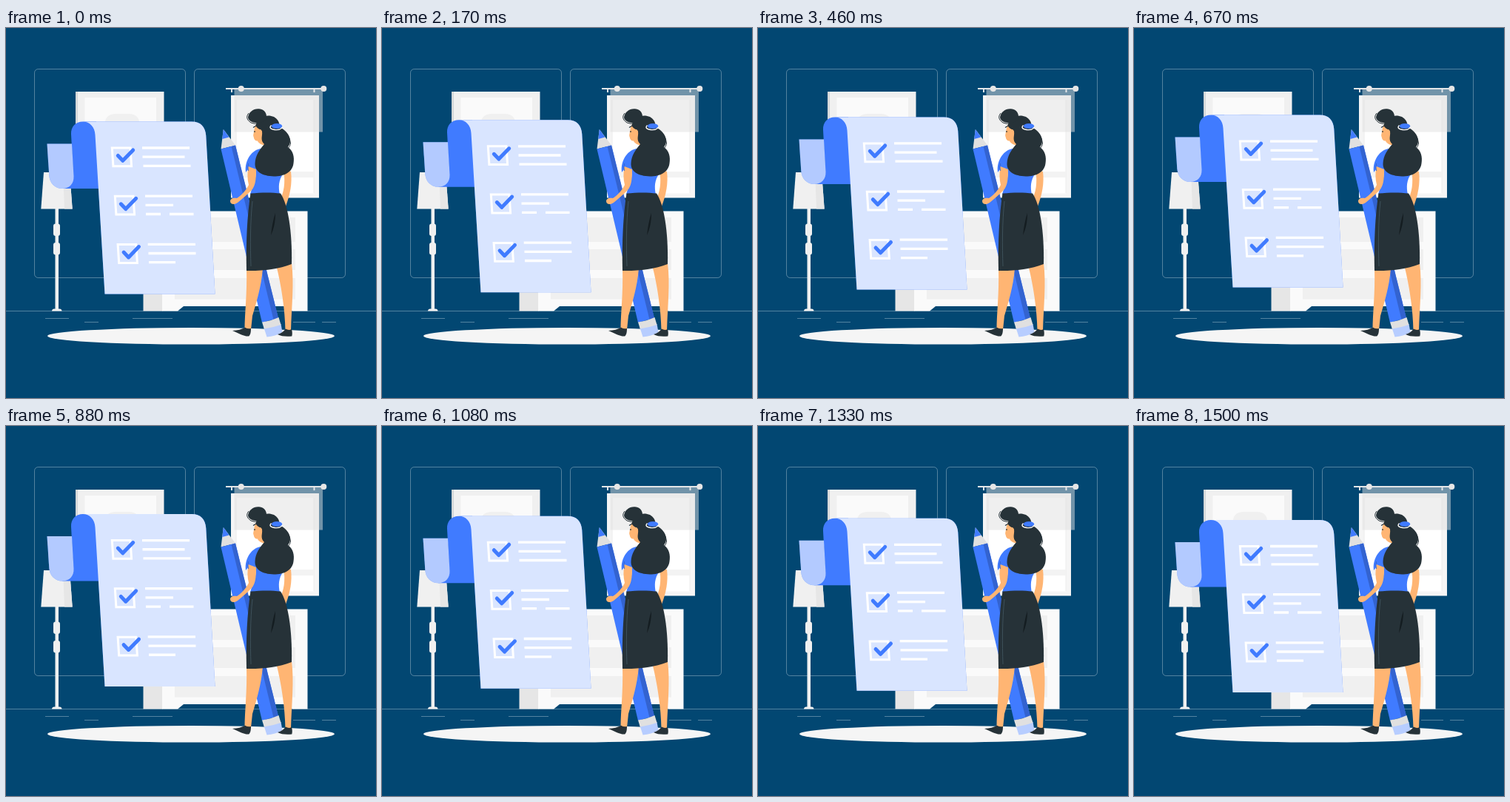
Write an HTML page that moves like this. It is 500 by 500 pixels and loops after 1540 ms.

```html
<!DOCTYPE html>
<html lang="en">
<head>
<meta charset="utf-8">
<title>Checklist</title>
<style>
  html, body { margin: 0; width: 100%; height: 100%; overflow: hidden; background: #024772; }
  svg { display: block; width: 100vw; height: 100vh; }
  .blue { fill: #407bff; }
  .skin { fill: #ffb573; }
  .dark { fill: #263238; }
  .thin { fill: none; stroke: #d8e3ea; stroke-opacity: .38; stroke-width: 1; }
</style>
</head>
<body>
<svg viewBox="0 0 500 500">
  <defs>
    <path id="sheet" d="M104 127H251C263 127 269.500 134 270.300 146L282.500 360H133.500L120.500 145C120 134 113 127 104 127Z"/>
    <path id="flap" d="M55.500 157H89L91.500 201C92 211 85.500 217.500 76 217.500C66 217.500 59 210 58.300 200Z"/>
    <g id="tick">
      <path d="M143.300 162.500H168L169.600 187.300H144.900Z" fill="none" stroke="#fff" stroke-width="3"/>
      <path d="M151.300 173L157.800 179.800L171.700 165.500" fill="none" stroke="#407bff" stroke-width="5" stroke-linecap="round" stroke-linejoin="round"/>
    </g>
  </defs>

  <!-- wall and floor -->
  <g class="thin">
    <rect x="38.500" y="55.500" width="204" height="282" rx="5"/>
    <rect x="254.500" y="55.500" width="204" height="282" rx="5"/>
    <path d="M0 382.500H500M53 392.500H85M106 397.500H125M171 392.500H225M388 397.500H418M427 397.500H446"/>
  </g>
  <ellipse cx="250" cy="416.300" rx="194" ry="11.300" fill="#f5f5f5"/>

  <!-- picture -->
  <rect x="94" y="86" width="4" height="114" fill="#d5d8da"/>
  <rect x="97" y="86" width="116.500" height="114" fill="#f0f0f0"/>
  <rect x="106.500" y="94" width="96.500" height="98" fill="#fafafa"/>
  <path d="M134 128C134 120 140 116 148 116H166C174 116 180 120 180 128Z" fill="#f0f0f0"/>

  <!-- window -->
  <rect x="304" y="91" width="119" height="138.500" fill="#f5f5f5"/>
  <rect x="311" y="97" width="105" height="126.500" fill="#fff"/>
  <path d="M311 97V223M416 97V223" stroke="#ececec"/>
  <rect x="311" y="194" width="105" height="8" fill="#f3f3f3"/>
  <rect x="308.500" y="83" width="119.500" height="57.500" fill="#e0e0e0" opacity=".5"/>
  <path d="M297 82H429M305 82V87M416.500 82V87" fill="none" stroke="#e4e6e8" stroke-width="2"/>
  <circle cx="317.800" cy="82" r="4" fill="#e6e6e6"/>
  <circle cx="429.300" cy="82" r="4" fill="#e6e6e6"/>

  <!-- drawers -->
  <rect x="185.500" y="247.500" width="26" height="135" fill="#e6e6e6"/>
  <path d="M211 247.500H407.500V382.500H387L379 376H240L232 382.500H211Z" fill="#fafafa"/>
  <path d="M228 256H391V289H228ZM228 299H391V327H228ZM228 338H391V366.500H228Z" fill="#f0f0f0"/>

  <!-- lamp -->
  <path d="M66.500 244H71V381H66.500Z" fill="#f0f0f0"/>
  <rect x="64" y="264.500" width="9" height="16.500" rx="3" fill="#f0f0f0"/>
  <rect x="64" y="290" width="9" height="16.500" rx="3" fill="#f0f0f0"/>
  <path d="M62 382.500C62 380.500 63.500 379.500 65 379.500H72.500C74 379.500 75.500 380.500 75.500 382.500Z" fill="#f0f0f0"/>
  <path d="M51 195H86L89.700 244.500H47.300Z" fill="#f0f0f0"/>
  <path d="M77 195H86L89.700 244.500H79Z" fill="#e6e6e6"/>

  <!-- paper -->
  <g id="paper">
    <path class="blue" d="M104 127C94 127 87.500 134 88 144L91 200L76 217.500H126.500L122 127Z"/>
    <use href="#flap" class="blue"/>
    <use href="#flap" fill="#fff" opacity=".6"/>
    <use href="#sheet" class="blue"/>
    <use href="#sheet" fill="#fff" opacity=".8"/>
    <use href="#tick"/>
    <use href="#tick" x="4" y="65.300"/>
    <use href="#tick" x="7.800" y="130.600"/>
    <path d="M184 162.500H248M184.500 174.700H241.500M185.500 186.800H249.500
      M188 227.600H252M188.500 239.800H226M189 252H209M221 252H253.500
      M191.700 292.800H256M192.500 305H256.500M193 317.200H229" fill="none" stroke="#fff" stroke-width="3.300"/>
  </g>

  <!-- pencil -->
  <path d="M293.800 137L310 158.500L290.500 163.500Z" fill="#e0e0e0"/>
  <path class="blue" d="M293.800 137L301.500 147.500L292.300 150Z"/>
  <path class="blue" d="M290.500 163.500L310 158.500L368 392L346 398Z"/>
  <path d="M304.500 160L310 158.500L368 392L361.500 394Z" fill="#3363d0"/>
  <path d="M348.500 405L371.500 400L373.500 411C367 415 360 417 352.500 417.500Z" fill="#b7cdff"/>
  <path d="M346 397.500Q357 396 368.500 391L371.500 401Q360 405 348.800 406.500Z" fill="#e0e0e0"/>

  <!-- legs and shoes -->
  <path class="skin" d="M325 325H347C345 350 338 372 333 389L331 408H322.500C322.500 385 326 360 325 325Z"/>
  <path class="skin" d="M365.500 322L386 318C389.500 345 386 375 385 409H377.500C377 380 372 348 365.500 322Z"/>
  <path class="dark" d="M306 409C313 409 319 407 323 404.800Q327 407 331 406C331 412 330 415 328 416.600C321 417 314 412 306 409Z"/>
  <path class="dark" d="M377.800 406.500Q382 409 386 407C387 411 387 414 386.300 416.500C380 417 372 417 367 414C372 412.500 375.500 410 377.800 406.500Z"/>

  <!-- body -->
  <path class="skin" d="M375 190L385 194C387 210 384 225 378 241L372 229C377 216 377 205 375 190Z"/>
  <path class="blue" d="M345 163C333 164 322 178 324 195L328 190L338 193C338 205 333 213 330 225H370C368 215 368 206 375 196L373 166Z"/>
  <path class="skin" d="M327.500 187L338 191C338 205 337 213 332 219C325 226 319 231 313 236C309 239 303 239 303 234C303 230 308 229 312 230C318 226 324 220 328 212C326 204 326 196 327.500 187Z"/>
  <path d="M327.500 183Q326 188 327.500 193" fill="none" stroke="#3363d0"/>
  <path class="dark" d="M330.500 223.500C345 222 360 222 371 223.500C381 238 387 275 386 319C368 326 345 328.500 325 328C324 290 326 252 330.500 223.500Z"/>
  <path d="M333 234C330 262 330 294 331 322" fill="none" stroke="#455a64" stroke-width=".8"/>
  <path d="M364 250C364 262 362 271 358 280C359 270 361 259 364 250Z" fill="#141d21"/>

  <!-- head -->
  <path class="skin" d="M339 129C335.500 134 335.500 138 334.500 143C333.500 146 335 147 335 149C336 152 338 152.500 340 152.500C341 156 346 158 351 159L362 150L354 130Z"/>
  <path class="dark" d="M337.500 132C339 121 352 115.500 362 120C367 123 370 127 369.500 134C376 137 384 143 384 153C384 157 382 159 381 161C388 166 390 174 388.500 183C387 195 376 200.500 362 200.500C346 200 336 194 336.500 183C337 172 343 164 349 157C343 151 347 146 346 140C344 136 341 138 337.500 132Z"/>
  <path class="dark" d="M327 121C328 113 335 108.500 342 109.300C350 110 354 117 351 124C346 130 329 130 327 121Z"/>
  <path d="M328 115Q322 122 331 128Q336 130 341 129M369 135Q384 143 384.500 156Q384 160 381 163" fill="none" stroke="#263238" stroke-width="1"/>
  <ellipse class="skin" cx="343" cy="141.500" rx="3" ry="4.500"/>
  <path d="M334 134.500L338 132M336 139V141" stroke="#263238" stroke-width="1.200"/>
  <path d="M358.500 131.500Q354 136 363 137.500Q369 138.500 373 135" fill="none" stroke="#fff" stroke-width="1.300"/>
  <ellipse class="blue" cx="366" cy="132.500" rx="7.200" ry="3.600"/>
</svg>
<script>
  const LOOP = 1540, STEPS = 37;
  // [time, vertical shift]
  const keys = [[0, -0.5], [712, -10], [1500, 0], [LOOP, -0.5]];
  const paper = document.getElementById("paper");

  function shiftAt(t) {
    const n = keys.findIndex(k => k[0] > t);
    const [t0, y0] = keys[n - 1], [t1, y1] = keys[n];
    return y0 + (y1 - y0) * (t - t0) / (t1 - t0);
  }

  function draw() {
    const t = performance.now() % LOOP;
    const step = Math.min(STEPS - 1, Math.floor(t / LOOP * STEPS + 0.1));
    paper.setAttribute("transform", `translate(0 ${shiftAt(step * LOOP / STEPS).toFixed(2)})`);
    requestAnimationFrame(draw);
  }
  draw();
</script>
</body>
</html>
```
